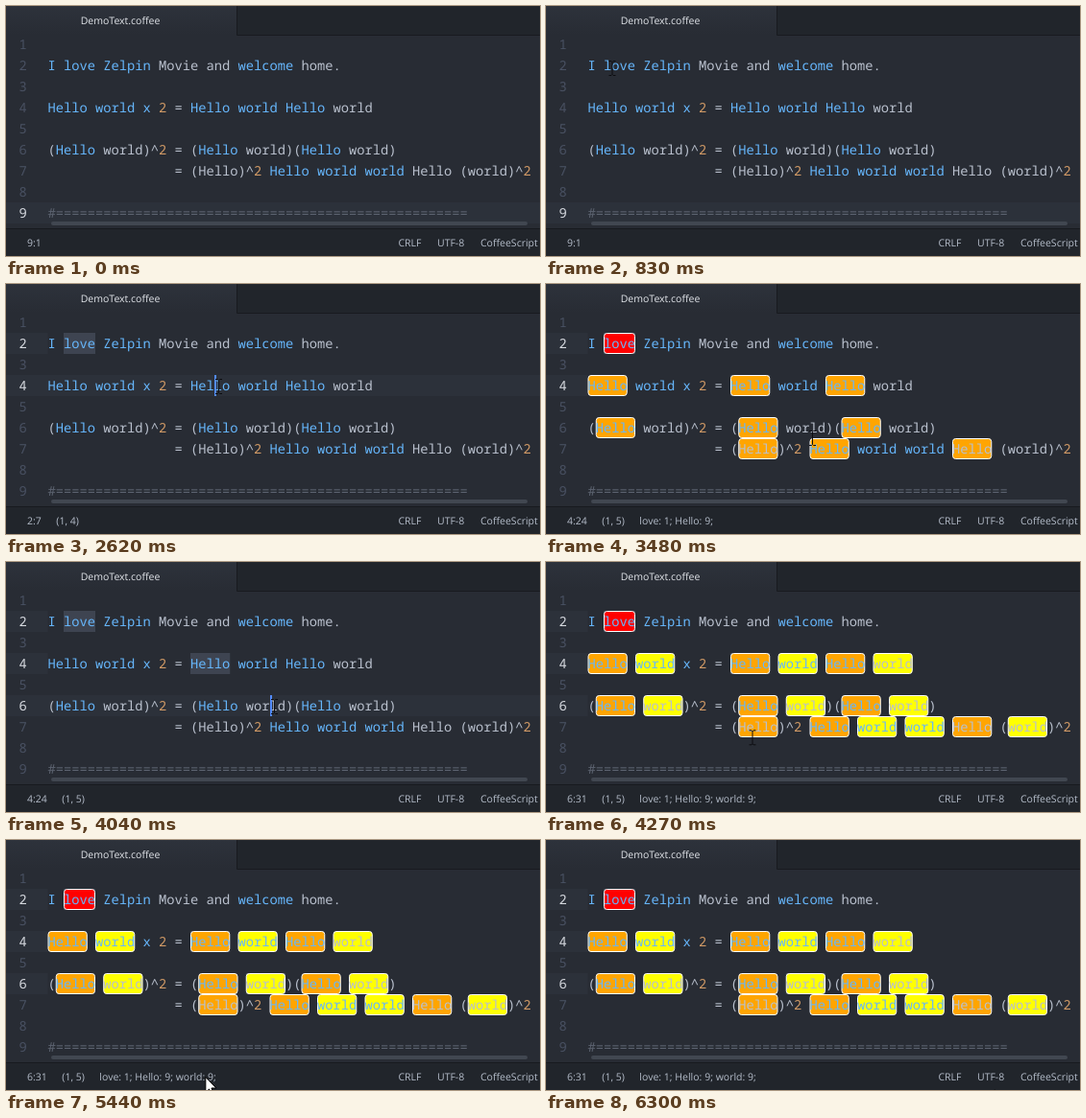
Animation of 556 by 261 pixels, one loop 6.87 s. Source, as an HTML page:

```html
<!DOCTYPE html>
<html lang="en">
<head>
<meta charset="utf-8">
<title>Word highlighter</title>
<style>
  html, body { margin: 0; width: 100%; height: 100%; overflow: hidden; background: #282c34; }
  svg { display: block; width: 556px; height: 261px; }
  text { white-space: pre; text-rendering: geometricPrecision; }
  .code { font: 500 13.75px "Noto Sans Mono", monospace; }
  .ui { font: 10.5px "Open Sans", sans-serif; fill: #b4bcc9; }
</style>
</head>
<body>
<svg viewBox="0 0 556 261">
  <defs>
    <linearGradient id="sheen" x2="0" y2="1">
      <stop stop-color="#2d323b"/><stop offset="1" stop-color="#282c34"/>
    </linearGradient>
  </defs>
  <rect width="556" height="261" fill="#282c34"/>
  <rect width="240" height="30" fill="url(#sheen)"/>
  <rect x="240" width="316" height="30" fill="#21252b"/>
  <path d="M240.5 0V30.5H556" fill="none" stroke="#181a1f"/>
  <text class="ui" x="119" y="19" text-anchor="middle" style="fill:#e2e5ea">DemoText.coffee</text>
  <g id="bands" fill="#2c313a"></g>
  <g id="marks" stroke="#fff"></g>
  <g id="code" class="code"></g>
  <rect id="caret" width="2" height="22" fill="#528bff"/>
  <rect x="47" y="225" width="496" height="4" rx="2" fill="#414751"/>
  <rect y="232" width="556" height="29" fill="#21252b"/>
  <path d="M0 232.5H556" stroke="#181a1f"/>
  <g class="ui">
    <text x="22" y="251"><tspan id="position"></tspan><tspan id="selection" dx="15.5"></tspan><tspan id="counts" dx="15.5"></tspan></text>
    <text x="408.5" y="251">CRLF</text>
    <text x="449" y="251">UTF-8</text>
    <text x="494" y="251">CoffeeScript</text>
  </g>
  <path id="beam" d="M-3.5 -7.5H-1L0 -6.5L1 -7.5H3.5M0 -6.5V6.5M-3.5 7.5H-1L0 6.5L1 7.5H3.5" fill="none" stroke="#0c0d10"/>
  <path id="arrow" d="M0.5 0.5V16.5L4.2 13L6.7 18.6L9 17.6L6.6 12H11.5Z" fill="#fff" stroke="#000"/>
</svg>
<script>
const LOOP = 6870, TICK = 77.5, LEFT = 43.5, ADVANCE = 8.25;
const BLUE = "#66b6fb", GREY = "#b9c0cd", ORANGE = "#d19a66", DIM = "#5c6370";

// An asterisk puts the next word in the function colour.
const lines = [
  "",
  "*I *love *Zelpin Movie and *welcome home.",
  "",
  "*Hello *world *x 2 = *Hello *world *Hello world",
  "",
  "(*Hello world)^2 = (*Hello world)(*Hello world)",
  " ".repeat(16) + "= (Hello)^2 *Hello *world *world Hello (world)^2",
  "",
  "#" + "=".repeat(52),
];

// Each word is clicked, then selected, then marked everywhere.
const picks = [
  { word: "love", color: "red", row: 2, col: 2, click: 1230, mark: 1380 },
  { word: "Hello", color: "orange", row: 4, col: 18, click: 2540, mark: 2720 },
  { word: "world", color: "yellow", row: 6, col: 25, click: 3940, mark: 4190 },
];

// Each move starts where the one before ended; "bend" is its curve's control point.
const entry = [0, 150];
const moves = [
  { start: 200, end: 830, bend: [105, 185], to: [69, 65] },
  { start: 900, end: 1060, to: [75.5, 65] },
  { start: 1600, end: 2140, bend: [245, 134], to: [227, 107] },
  { start: 2370, end: 2370, to: [221.5, 107] },
  { start: 3170, end: 3480, to: [277.5, 161] },
  { start: 3620, end: 3710, to: [279.5, 151] },
  { start: 4190, end: 4590, to: [86, 248] },
  { start: 4670, end: 5060, bend: [74, 248], to: [234, 247] },
  { start: 5140, end: 5290, to: [180, 247] },
  { start: 5370, end: 5520, to: [221, 247] },
  { start: 5690, end: 6300, bend: [350, 242], to: [500, 265] },
];

const $ = id => document.getElementById(id);
const columnX = col => LEFT + col * ADVANCE;
const rowY = row => 7 + 22 * row;
const show = (node, visible) => node.style.display = visible ? "" : "none";

function set(node, attrs) {
  for (const name in attrs) node.setAttribute(name, attrs[name]);
  return node;
}

function add(parent, tag, attrs, content = "") {
  const node = set(document.createElementNS("http://www.w3.org/2000/svg", tag), attrs);
  node.textContent = content;
  return parent.appendChild(node);
}

function tokenColor(token, isFunction) {
  if (isFunction) return BLUE;
  if (token[0] === "#") return DIM;
  return /\d/.test(token) ? ORANGE : GREY;
}

for (const pick of picks) {
  const { word, row, col, click, mark } = pick;
  pick.select = click + (mark - click) * .6;
  pick.caret = col + Math.ceil(word.length / 2);
  pick.at = `${row}:${col + word.length + 1}`;
  pick.boxes = [];
  pick.shade = add($("marks"), "rect", {
    x: columnX(col), y: rowY(row), height: 22,
    width: word.length * ADVANCE, fill: "#3e4451", stroke: "none",
  });
}

function addToken(token, isFunction, row, col) {
  const x = columnX(col), y = rowY(row);
  add($("code"), "text", { x, y: y + 16, fill: tokenColor(token, isFunction) }, token);
  const pick = picks.find(p => p.word === token);
  pick?.boxes.push(add($("marks"), "rect", {
    x: x + .5, y: y + .5, rx: 3, height: 21,
    width: token.length * ADVANCE - 1, fill: pick.color,
  }));
}

const rows = lines.map((line, i) => {
  const row = i + 1;
  let col = 0;
  for (const [text, star, token] of line.matchAll(/(\*?)(\w+|[^\w\s*]+)|\s+/g)) {
    if (token) addToken(token, star, row, col);
    col += (token || text).length;
  }
  return {
    row,
    band: add($("bands"), "rect", { y: rowY(row), height: 22 }),
    number: add($("code"), "text", { x: 13.5, y: rowY(row) + 16 }, row),
  };
});

// The pointer advances in ticks and is already one step along when a move starts.
function pointerAt(t) {
  const index = moves.findLastIndex(m => t >= m.start);
  if (index < 0) return null;
  const { start, end, bend, to } = moves[index];
  const from = index ? moves[index - 1].to : entry;
  const steps = Math.round((end - start) / TICK) + 1;
  const p = Math.min(1, (Math.floor((t - start) / TICK + .1) + 1) / steps);
  return to.map((b, axis) => {
    const a = from[axis], c = bend ? bend[axis] : (a + b) / 2;
    return a * (1 - p) ** 2 + 2 * c * p * (1 - p) + b * p * p;
  });
}

function drawPointer(t) {
  const point = pointerAt(t);
  const overBar = point && point[1] > 232;
  show($("beam"), point && !overBar);
  show($("arrow"), overBar);
  if (point) set($(overBar ? "arrow" : "beam"), { transform: `translate(${point})` });
}

function drawEditor(t) {
  const clicked = picks.filter(p => t >= p.click);
  const current = clicked.at(-1);
  const selected = picks.findLast(p => t >= p.select);
  const placing = current && t < current.select;
  const marked = current && t >= current.mark;
  const wideRow = !current ? lines.length : placing ? current.row : 0;

  for (const { row, band, number } of rows) {
    const active = row === wideRow || clicked.some(p => p.row === row);
    set(band, { width: row === wideRow ? 556 : active ? LEFT : 0 });
    set(number, { fill: active ? "#d7dae0" : "#495162" });
  }

  show($("caret"), placing);
  if (placing) set($("caret"), { x: Math.round(columnX(current.caret)), y: rowY(current.row) });

  for (const pick of picks) {
    show(pick.shade, t >= pick.select);
    for (const box of pick.boxes) show(box, marked && clicked.includes(pick));
  }

  $("position").textContent = selected ? selected.at : `${lines.length}:1`;
  $("selection").textContent = selected ? `(1, ${selected.word.length})` : "";
  $("counts").textContent = marked
    ? clicked.map(p => `${p.word}: ${p.boxes.length};`).join(" ") : "";
}

const begin = performance.now();
function frame() {
  const t = (performance.now() - begin) % LOOP;
  drawEditor(t);
  drawPointer(t);
  requestAnimationFrame(frame);
}
frame();
</script>
</body>
</html>
```
